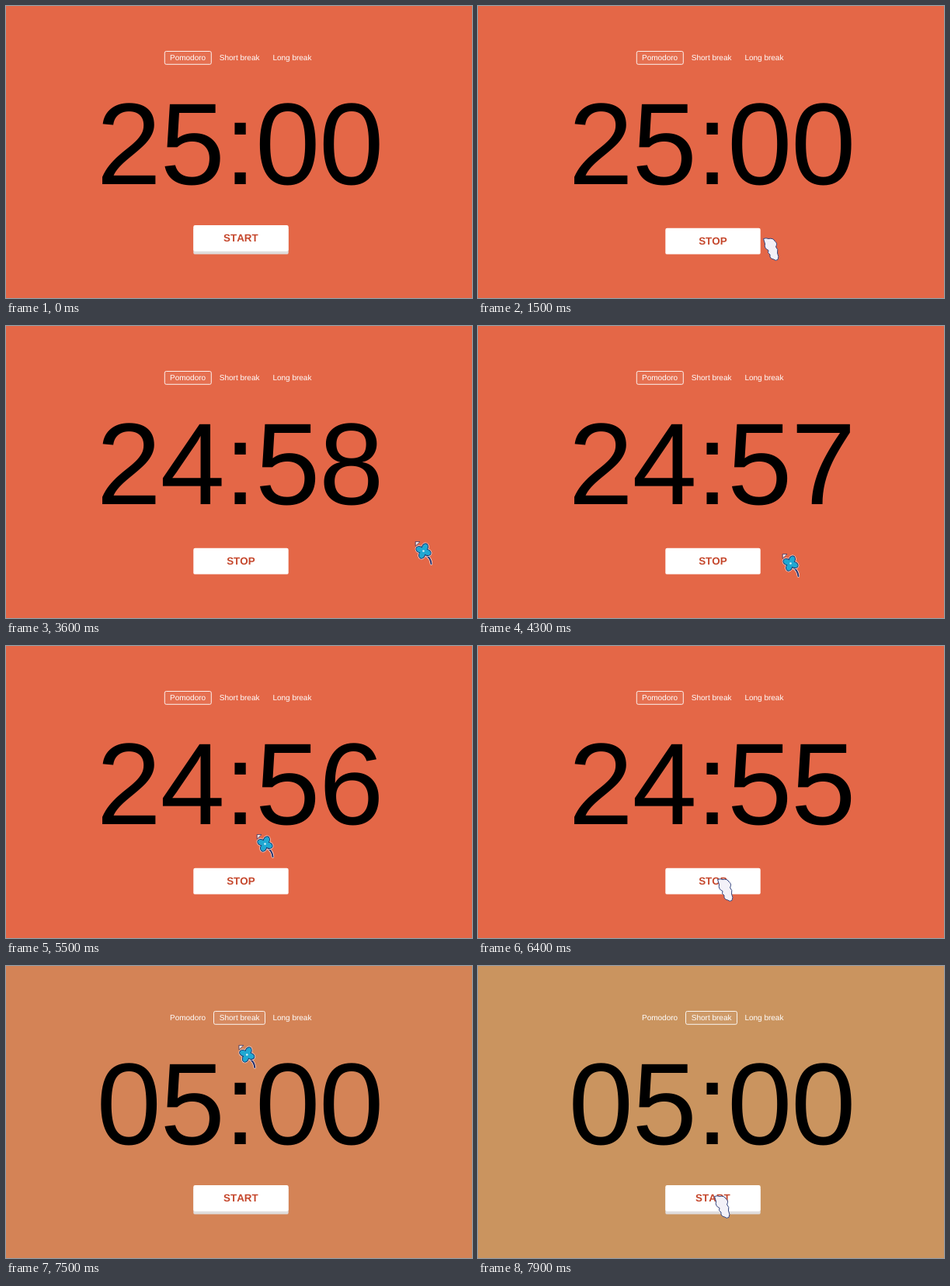
Animation, 600 px wide and 377 px high, one loop 8 s. Source, as an HTML page:

```html
<!DOCTYPE html>
<html lang="en">
<head>
<meta charset="utf-8">
<title>Pomodoro timer</title>
<style>
  html, body { margin: 0; width: 100%; height: 100%; overflow: hidden; background: #e46747; }
  svg { display: block; width: 600px; height: 377px; }
  text { font-family: "Liberation Sans", Arial, sans-serif; text-rendering: geometricPrecision; }
  .tab { font-size: 10px; fill: #fff; }
  #clock { font-size: 150px; letter-spacing: -1.35px; }
  #label { font-size: 13.4px; font-weight: bold; font-kerning: none; text-anchor: middle; fill: #c5472c; }
</style>
</head>
<body>
<svg viewBox="0 0 600 377">
  <rect id="bg" width="600" height="377"/>
  <rect id="frame" y="58.5" height="16.8" rx="2" fill="#fff" fill-opacity=".05" stroke="#fff" stroke-opacity=".9"/>
  <text class="tab" x="211" y="70.4">Pomodoro</text>
  <text class="tab" x="274.8" y="70.4">Short break</text>
  <text class="tab" x="343.4" y="70.4">Long break</text>
  <text id="clock" x="116.5" y="230.3"></text>
  <rect id="lip" x="241.3" y="286" width="122.4" height="34.6" rx="2.2" fill="#dfdddd"/>
  <g id="button">
    <rect x="241.3" y="283" width="122.4" height="33.8" rx="2.2" fill="#fff"/>
    <text id="label" x="302.4" y="304.4"></text>
  </g>
  <g id="flower" stroke-linejoin="round" stroke-linecap="round">
    <path d="M14 18Q20 22 20.500 29" fill="none" stroke="#f4dcd8" stroke-width="3.400"/>
    <path d="M14 18Q20 22 20.500 29" fill="none" stroke="#25306a" stroke-width="2"/>
    <g id="halo" fill="#f6e4e2" stroke="#f6e4e2" stroke-width="3.200"></g>
    <g id="rim" fill="#1d2d62" stroke="#1d2d62" stroke-width="1.800"></g>
    <g id="petals" fill="#20a8d2"></g>
    <circle cx="10.500" cy="12.500" r="1.300" fill="#d9f2f8"/>
    <path d="M.5 .5H6L.5 6Z" fill="#f8e9e6" stroke="#25306a" stroke-width=".7"/>
  </g>
  <path id="hand" fill="#f3f1f8" stroke="#34457f" stroke-width="1" stroke-linejoin="round"
    d="M.5 1.500Q4 0 7 1.500Q13 0 15.500 5Q19 7 16.500 12Q20 15 18.500 20Q21 25 19 28.500Q16 30.500 13.500 28Q8 27 9 22Q5 20 7 16.500Q1 14 2.500 8Z"/>
</svg>
<script>
const LOOP = 8000, STEP = 100;
const STARTED = 1300, STOPPED = 6600, SWITCHED = 7150;
const RED = [228, 103, 71], TAN = [201, 150, 96];
const $ = id => document.getElementById(id);
const set = (id, attrs) => {
  for (const k in attrs) $(id).setAttribute(k, attrs[k]);
};
const show = (id, on) => set(id, { visibility: on ? "visible" : "hidden" });

// Pointer trips: each point is [ms, x, y]
const trips = [
  [[600, 421, 303], [900, 332, 300], [1400, 332, 299], [1500, 367, 299], [1700, 575, 358]],
  [[3600, 527, 278], [3700, 448, 282], [3800, 405, 283], [3900, 405, 283],
   [4100, 392, 294], [5100, 392, 294], [5500, 323, 243], [5700, 314, 252],
   [6100, 308, 300], [6600, 308, 300], [7000, 299, 66], [7400, 299, 66],
   [7800, 304, 296], [8000, 304, 296]]
];

const petal = angle =>
  `<ellipse cx="10.500" cy="7.600" rx="3.500" ry="4.900" transform="rotate(${angle} 10.500 12.500)"/>`;
for (const id of ["halo", "rim", "petals"])
  $(id).innerHTML = [22, 112, 202, 292].map(petal).join("");

function pointer(t) {
  const trip = trips.find(p => t >= p[0][0] && t <= p[p.length - 1][0]);
  if (!trip) return null;
  const i = Math.max(1, trip.findIndex(p => p[0] >= t));
  const [t0, x0, y0] = trip[i - 1], [t1, x1, y1] = trip[i];
  const k = (t - t0) / (t1 - t0), e = k * k * (3 - 2 * k);
  return [x0 + (x1 - x0) * e, y0 + (y1 - y0) * e];
}

// CSS "ease": cubic-bezier(.25, .1, .25, 1)
function ease(x) {
  if (x <= 0) return 0;
  if (x >= 1) return 1;
  let lo = 0, hi = 1, s;
  for (let i = 0; i < 20; i++) {
    s = (lo + hi) / 2;
    const bx = .75 * s * (1 - s) + s ** 3;
    if (bx < x) lo = s; else hi = s;
  }
  return .3 * s * (1 - s) ** 2 + 3 * s * s * (1 - s) + s ** 3;
}

function clockText(t) {
  if (t >= SWITCHED) return "05:00";
  const run = Math.max(0, Math.min(t, STOPPED) - STARTED);
  const left = 1500 - Math.floor(run / 1000);
  const two = n => String(n).padStart(2, "0");
  return two(Math.floor(left / 60)) + ":" + two(left % 60);
}

function draw(t) {
  const running = t >= STARTED && t < STOPPED, short = t >= SWITCHED;
  const mix = ease((t - SWITCHED) / 1000);
  set("bg", { fill: `rgb(${RED.map((c, i) => Math.round(c + (TAN[i] - c) * mix))})` });
  set("frame", short ? { x: 267.5, width: 66 } : { x: 204.3, width: 60 });
  $("clock").textContent = clockText(t);
  $("label").textContent = running ? "STOP" : "START";
  set("button", { transform: `translate(0 ${running ? 3.8 : 0})` });
  show("lip", !running);

  const p = pointer(t);
  let over = false;
  if (p) {
    const [x, y] = p;
    over = (x > 241 && x < 369 && y > 283 && y < 321) ||
           (x > 204 && x < 400 && y > 58 && y < 76);
    set(over ? "hand" : "flower", { transform: `translate(${x} ${y})` });
  }
  show("hand", p && over);
  show("flower", p && !over);
}

const begin = performance.now();
function tick() {
  const t = (performance.now() - begin) % LOOP;
  draw(Math.floor(t / STEP) * STEP);
  requestAnimationFrame(tick);
}
draw(0);
requestAnimationFrame(tick);
</script>
</body>
</html>
```
